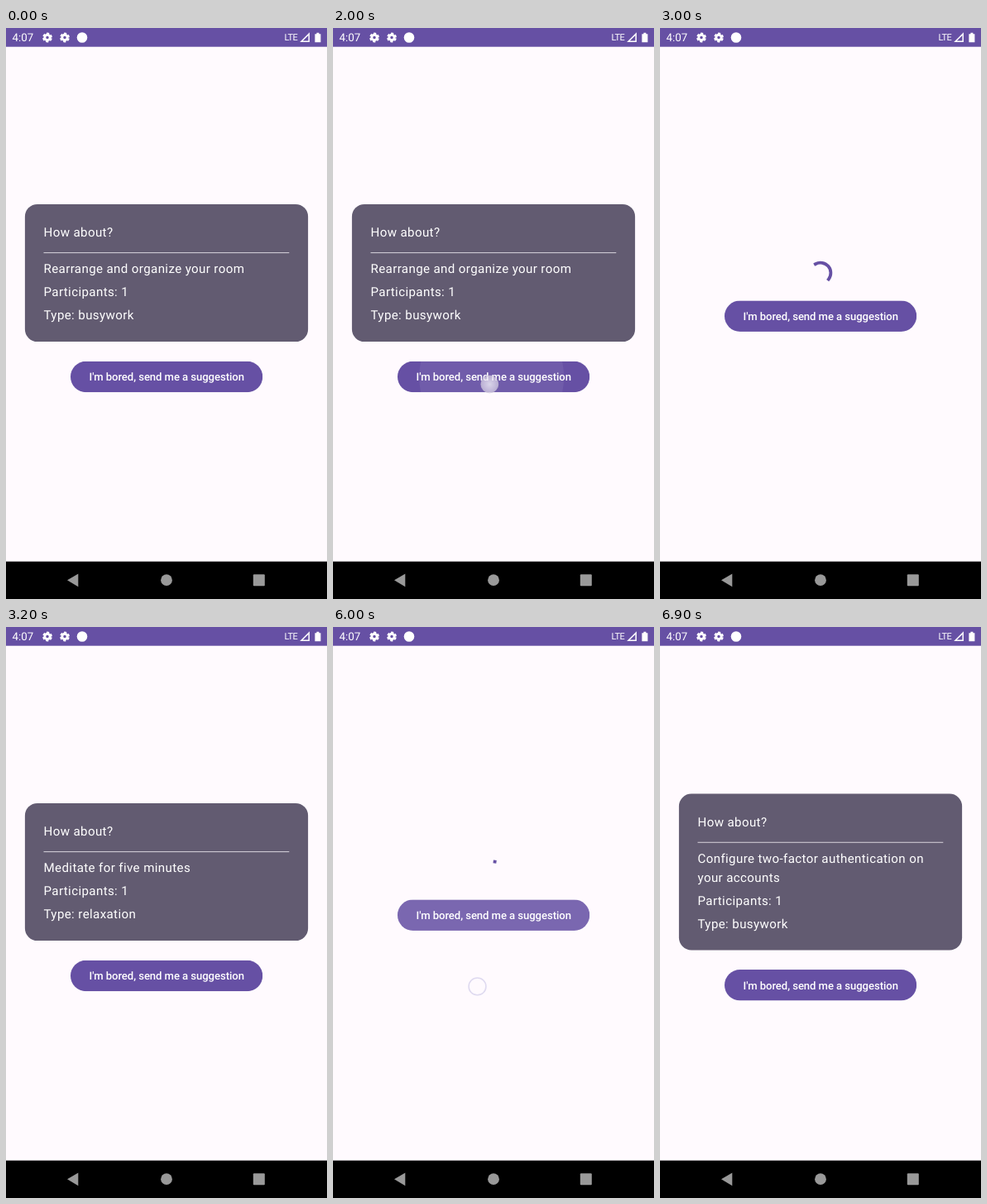
Recreate the animation shown at these times as an HTML page. Size 388x690 px, loop 8000 ms.

```html
<!DOCTYPE html>
<html lang="en">
<head>
<meta charset="utf-8">
<title>Suggestion app</title>
<style>
  html, body { margin: 0; width: 100%; height: 100%; overflow: hidden; background: #fffafe; }
  svg { display: block; width: 388px; height: 690px; font-family: Roboto, sans-serif; fill: #fff; text-rendering: geometricPrecision; }
  .body { font-size: 15.1px; letter-spacing: .38px; }
  .label { font-size: 13.1px; font-weight: 500; letter-spacing: -.06px; }
</style>
</head>
<body>
<svg viewBox="0 0 388 690">
  <defs>
    <clipPath id="pill"><rect x="78" width="232.2" height="37.5" rx="18.75"/></clipPath>
    <radialGradient id="glow">
      <stop offset="0" stop-color="#fff" stop-opacity=".74"/>
      <stop offset=".55" stop-color="#eeeaf4" stop-opacity=".7"/>
      <stop offset="1" stop-color="#e0dae8" stop-opacity=".66"/>
    </radialGradient>
    <g id="gear" fill="none" stroke="#fff">
      <circle r="3.2" stroke-width="2.9"/>
      <circle r="5" stroke-width="1.9" stroke-dasharray="3.1 2.136" stroke-dashoffset="4.17"/>
    </g>
  </defs>
  <rect width="388" height="690" fill="#fffafe"/>

  <rect width="388" height="22.7" fill="#6650a4"/>
  <text x="7.6" y="16.2" font-size="13.3">4:07</text>
  <use href="#gear" x="50" y="11.5"/>
  <use href="#gear" x="71" y="11.5"/>
  <circle cx="92" cy="11.5" r="6.3"/>
  <text x="336.6" y="15.4" font-size="11" letter-spacing="-.6">LTE</text>
  <path d="M357 16.3H366.2V7.1Z" fill="none" stroke="#fff" stroke-width="1.5"/>
  <path d="M373.4 7.2h2v-1.4h3v1.4h2v10h-7z"/>

  <rect y="644.7" width="388" height="45.3" fill="#000"/>
  <g fill="#999">
    <path d="M74 667.3L87.3 659.4V675.2Z"/>
    <circle cx="194" cy="667.2" r="6.9"/>
    <rect x="298.8" y="660.3" width="14" height="14" rx="1"/>
  </g>

  <g id="card" class="body">
    <rect id="panel" x="22.9" width="342.2" rx="15.1" fill="#625b71"/>
    <text x="45.5" y="39.2">How about?</text>
    <rect x="45.5" y="58.2" width="296.8" height="1" fill="#d8d4dd"/>
    <g id="lines"></g>
  </g>

  <path id="spinner" fill="none" stroke="#6650a4" stroke-width="3.8" stroke-linecap="square"/>

  <g id="button">
    <g clip-path="url(#pill)">
      <rect x="78" width="232.2" height="37.5" fill="#6650a4"/>
      <circle id="ripple" cy="19"/>
    </g>
    <text class="label" x="194.2" y="23.5" text-anchor="middle">I'm bored, send me a suggestion</text>
  </g>

  <circle id="touch" r="10.4"/>
</svg>
<script>
const LOOP = 8000, STEP = 100;
const LINE = 22.65, GAP = 28;
const $ = id => document.getElementById(id);

const suggestions = [
  { from: 0, text: ["Rearrange and organize your room"], type: "busywork" },
  { from: 3100, text: ["Meditate for five minutes"], type: "relaxation" },
  { from: 6800, text: ["Configure two-factor authentication on", "your accounts"], type: "busywork" },
];
const taps = [
  { at: 1900, x: 189.3, y: 430.5, spin: 2112, done: 3100 },
  { at: 5800, x: 174.5, y: 434.4, spin: 5998, done: 6800 },
];

const set = (el, attrs) => { for (const k in attrs) el.setAttribute(k, attrs[k]); };
const show = (el, on) => { el.style.display = on ? "" : "none"; };
const clamp = v => Math.min(1, Math.max(0, v));

// cubic-bezier(.4, 0, .2, 1), solved by bisection
function ease(x) {
  let lo = 0, hi = 1, u;
  for (let i = 0; i < 20; i++) {
    u = (lo + hi) / 2;
    const bx = 1.2 * (1 - u) ** 2 * u + .6 * (1 - u) * u * u + u ** 3;
    if (bx < x) lo = u; else hi = u;
  }
  return 3 * (1 - u) * u * u + u ** 3;
}

function drawSpinner(ms) {
  const turn = 1332, r = 12.4, n = Math.floor(ms / turn), p = ms % turn;
  const tail = 290 * ease(clamp((p - 666) / 666));
  const head = 290 * ease(clamp(p / 666));
  const start = -83 + n * 216 + 286 * p / turn + tail;
  const sweep = Math.max(head - tail, .1);
  const point = deg => {
    const a = deg * Math.PI / 180;
    return `${194 + r * Math.cos(a)} ${296 + r * Math.sin(a)}`;
  };
  set($("spinner"), { d: `M${point(start)}A${r} ${r} 0 ${+(sweep > 180)} 1 ${point(start + sweep)}` });
}

let current;
function drawCard(item) {
  const extra = (item.text.length - 1) * LINE;
  const top = 212.9 - extra / 2, height = 166.2 + extra;
  set($("button"), { transform: `translate(0 ${top + height + 23.6})` });
  if (item === current) return;
  current = item;
  set($("card"), { transform: `translate(0 ${top})` });
  set($("panel"), { height });
  const rows = item.text.map((s, i) => [s, 83.6 + i * LINE]);
  rows.push(["Participants: 1", 83.6 + extra + GAP], ["Type: " + item.type, 83.6 + extra + 2 * GAP]);
  $("lines").replaceChildren(...rows.map(([s, y]) => {
    const el = document.createElementNS("http://www.w3.org/2000/svg", "text");
    set(el, { x: 45.5, y });
    el.textContent = s;
    return el;
  }));
}

function drawTap(tap, age) {
  const pressed = age < 200;
  show($("touch"), age < 300);
  set($("touch"), {
    cx: tap.x, cy: tap.y,
    fill: pressed ? "url(#glow)" : "none",
    stroke: pressed ? "#c9c2d8" : "#dfdaf0",
    "stroke-width": pressed ? 1 : 1.6,
    "stroke-opacity": pressed ? .7 : 1,
  });
  const alpha = age <= 200 ? .13 * clamp(age / 200) : .13 * clamp(1 - (age - 200) / 180);
  set($("ripple"), { cx: (tap.x + 194) / 2, r: 45 + 85 * clamp(age / 200), "fill-opacity": alpha });
}

function draw(now) {
  const t = Math.floor(now % LOOP / STEP) * STEP;
  const tap = taps.find(p => t >= p.at && t < p.done);
  const loading = !!tap && t >= tap.at + 200;

  show($("card"), !loading);
  show($("spinner"), loading);
  show($("touch"), false);
  show($("ripple"), !!tap);

  if (loading) {
    drawSpinner(Math.max(0, t - tap.spin));
    set($("button"), { transform: "translate(0 329.4)" });
  } else {
    drawCard(suggestions.findLast(s => t >= s.from));
  }
  if (tap) drawTap(tap, t - tap.at);
}

const begin = performance.now();
(function frame() {
  draw(performance.now() - begin);
  requestAnimationFrame(frame);
})();
</script>
</body>
</html>
```
